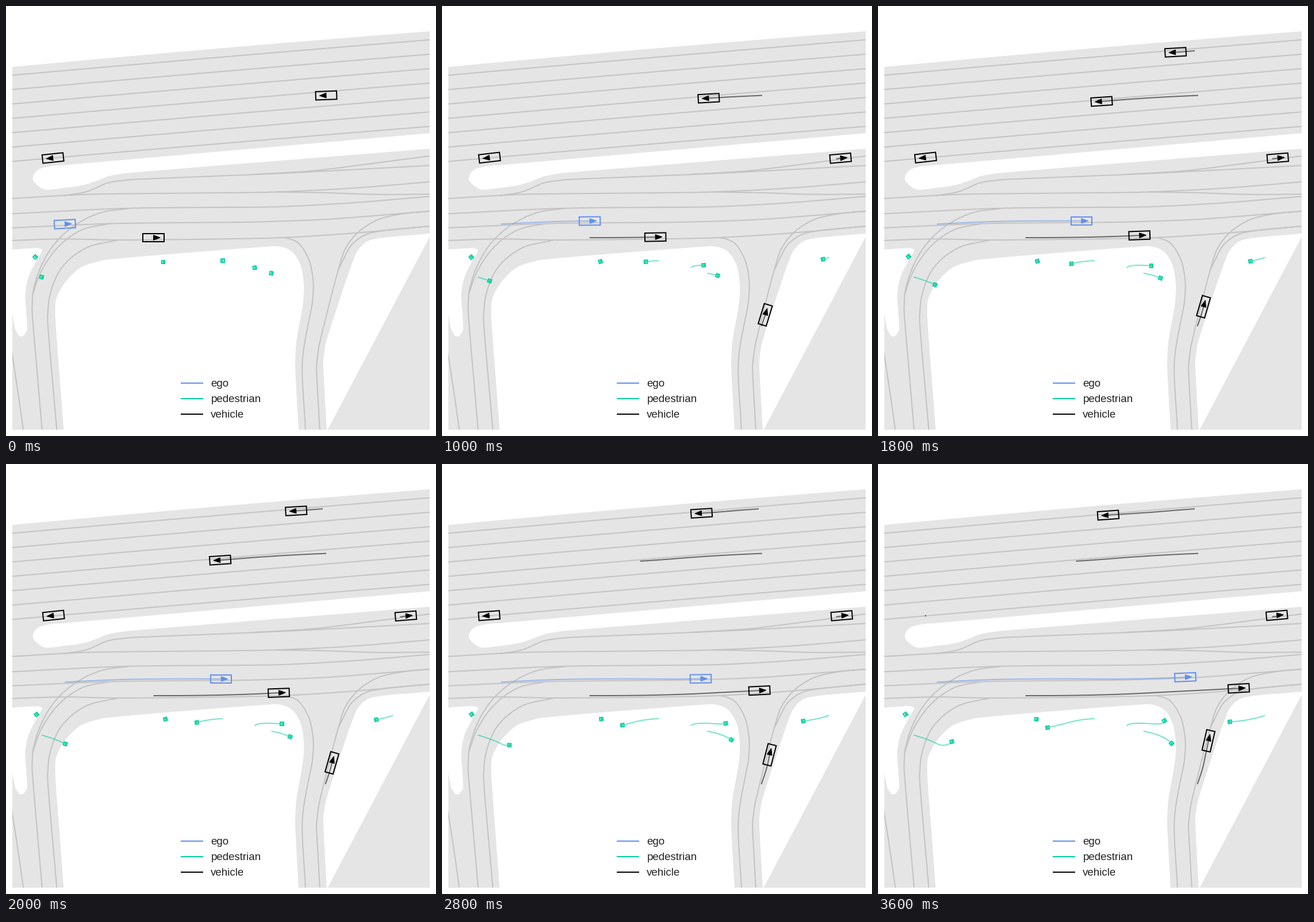
Recreate the animation shown at these times as a matplotlib script. Size 748 by 748 pixels, loop 3800 ms.

```python
import numpy as np
import matplotlib.pyplot as plt
from matplotlib.animation import FuncAnimation
from matplotlib.patches import Polygon

SIZE, DPI = 748, 64
PT = 72 / DPI  # points per pixel
LEFT, RIGHT = 11, 737
FRAMES, STEP = 19, 200

ROAD, LANE = "#e5e5e5", "#c3c3c3"
EGO, PED, CAR = "#6290ec", "#00d0a0", "#000000"

fig = plt.figure(figsize=(SIZE / DPI, SIZE / DPI), dpi=DPI, facecolor="white")
span = (RIGHT - LEFT) / SIZE
ax = fig.add_axes([LEFT / SIZE, LEFT / SIZE, span, span])
ax.set_xlim(LEFT, RIGHT)
ax.set_ylim(RIGHT, LEFT)
ax.axis("off")


def curve(*pts):
    """Smooth path whose handles follow the shorter neighbouring side."""
    pts = np.array(pts, float)
    side = np.hypot(*np.diff(pts, axis=0).T)
    tangent = np.gradient(pts, np.r_[0, np.cumsum(side)], axis=0)
    tangent /= np.hypot(*tangent.T)[:, None]
    reach = np.minimum(np.r_[side, side[-1]], np.r_[side[0], side])
    handle = tangent * reach[:, None] * 0.35
    s = np.linspace(0, 1, 20)[:, None]
    parts = [(1 - s) ** 3 * p + 3 * s * (1 - s) ** 2 * (p + a)
             + 3 * s * s * (1 - s) * (q - b) + s ** 3 * q
             for p, q, a, b in zip(pts, pts[1:], handle, handle[1:])]
    return np.concatenate(parts)


def bowed(y0, y1, lift):
    x = np.linspace(LEFT - 1, RIGHT + 1, 60)
    s = (x - LEFT) / (RIGHT - LEFT)
    return np.c_[x, y0 + (y1 - y0) * s - 4 * lift * s * (1 - s)]


def area(pts, color="white"):
    ax.add_patch(Polygon(pts, fc=color, ec="none", lw=0, zorder=1))


def line(pts, color=LANE, **kw):
    pts = np.asarray(pts, float)
    return ax.plot(pts[:, 0], pts[:, 1], color=color, lw=2 * PT,
                   solid_capstyle="butt", solid_joinstyle="round", **kw)[0]


def lane(*pts):
    line(curve(*pts))


def draw_gaps():
    # median
    area(curve((740, 221), (100, 276.8), (75, 279), (54, 286), (46.5, 300), (64, 318),
               (100, 316.5), (140, 310), (180, 295.7), (207, 291), (740, 248)))
    # island on the left
    area(curve((5, 424), (56, 421.2), (62.5, 424), (53, 443), (39, 472),
               (33.5, 500), (36, 566), (26, 575), (17, 565), (5, 500)))
    # block between the side roads
    area(curve((100.5, 740), (85.5, 535), (87, 511), (102, 482), (130, 455),
               (165, 443), (450, 419), (475, 418.2), (497, 427), (512, 450),
               (518, 485), (517, 515), (505, 585), (503, 620), (509, 740)))
    # block on the right
    area(curve((558, 740), (552, 615), (556, 588), (601, 450), (612, 425),
               (629, 409), (652, 403.5), (740, 395.7)))


def draw_lanes():
    for k in range(7):
        line(bowed(120.4 + 25 * k, 58.8 + 25.1 * k, 0.6))
    lane((8, 335), (130, 328), (470, 323.5), (600, 317), (740, 305.7))
    lane((8, 361.5), (200, 352.2), (480, 349), (600, 342.5), (740, 331))
    lane((8, 386), (180, 378.6), (430, 375.7), (550, 371.5), (740, 356.7))
    lane((8, 408), (95, 405.3), (190, 407), (480, 403), (600, 395.5), (740, 382.7))
    # splits and merges
    lane((470, 323.5), (560, 325), (640, 327.7), (740, 327.3))
    lane((100, 330), (140, 323), (178, 307.5), (212, 302.5), (480, 291), (740, 277.3))
    lane((430, 293), (530, 287), (740, 260.5))
    # side road on the left
    lane((63, 740), (45.3, 526), (47, 498), (60, 455), (85, 413), (122, 380),
         (165, 359.5), (215, 352))
    lane((46.5, 501), (60, 464), (90, 420), (132, 389.5), (180, 378.6))
    lane((88.5, 740), (72.3, 540), (76, 505), (95, 458), (137, 422), (195, 407))
    lane((8, 588), (22, 680), (30.5, 740))
    # side road on the right
    lane((470, 403), (487, 403.5), (507, 411), (526, 439), (534.5, 480),
         (533, 515), (516, 613), (521, 740))
    lane((546, 740), (540.3, 625), (544, 594), (578, 459), (590, 423),
         (610, 396), (645, 372.5), (690, 361.5), (740, 356.7))
    lane((578, 459), (602, 414.5), (626, 397.5), (655, 391), (740, 382.7))


def draw_legend():
    rows = (("ego", EGO), ("pedestrian", PED), ("vehicle", CAR))
    for i, (name, color) in enumerate(rows):
        y = 655.5 + 27.2 * i
        line([(304, y), (343, y)], color, zorder=3)
        ax.text(356.4, y + 6.6, name, family="Liberation Sans", size=18.7 * PT,
                color="#222222", va="baseline")


def glide(keys, ticks):
    """Positions at ticks from a smooth curve through (frame, x, y) keys."""
    t, pts = keys[:, 0], keys[:, 1:]
    speed = np.gradient(pts, t, axis=0, edge_order=2)
    i = np.clip(np.searchsorted(t, ticks, side="right") - 1, 0, len(t) - 2)
    h = (t[i + 1] - t[i])[:, None]
    s = (ticks - t[i])[:, None] / h
    return ((1 + 2 * s) * (1 - s) ** 2 * pts[i] + s * (1 - s) ** 2 * h * speed[i]
            + s * s * (3 - 2 * s) * pts[i + 1] + s * s * (s - 1) * h * speed[i + 1])


class Agent:
    """A heading box that leaves a trail; headings are spread evenly over its life."""

    def __init__(self, color, headings, *keys, end=FRAMES):
        keys = np.array(keys, float)
        self.start, self.end = int(keys[0, 0]), end
        ticks = np.arange(self.start, end, dtype=float)
        self.path = glide(keys, ticks)
        self.heading = np.radians(np.interp(
            ticks, np.linspace(self.start, end - 1, len(headings)), headings))
        self.trail = line([(0, 0)], color, alpha=0.55, zorder=4)
        style = dict(ec=color, joinstyle="miter", zorder=5)
        self.box = ax.add_patch(Polygon([(0, 0)] * 4, fc="none", lw=2 * PT, **style))
        self.tip = ax.add_patch(Polygon([(0, 0)] * 3, fc=color, lw=PT, **style))
        w, h = (5.6, 5.6) if color == PED else (36.5, 14.5)
        self.box_pts = np.array([(-w, -h), (w, -h), (w, h), (-w, h)]) / 2
        self.tip_pts = np.array([(0, -0.3 * h), (0.32 * w, 0), (0, 0.3 * h)])

    def show(self, frame):
        n = max(0, frame - self.start + 1)
        self.trail.set_data(*self.path[:n].T)
        live = self.start <= frame < self.end
        self.box.set_visible(live)
        self.tip.set_visible(live)
        if live:
            a = self.heading[n - 1]
            turn = np.array([(np.cos(a), -np.sin(a)), (np.sin(a), np.cos(a))])
            self.box.set_xy(self.box_pts @ turn + self.path[n - 1])
            self.tip.set_xy(self.tip_pts @ turn + self.path[n - 1])


area(np.r_[bowed(106, 44, 1.5), [(740, 740), (8, 740)]], ROAD)
draw_gaps()
draw_lanes()
draw_legend()

agents = [
    Agent(CAR, (182, 183.5, 184), (0, 557, 155.6), (7, 426.5, 163),
          (9, 389, 166), (12, 344.5, 169), end=13),
    Agent(CAR, (186, 187, 184), (0, 81.7, 264.4), (8, 82.8, 263.7),
          (15, 81.8, 263.8), end=16),
    Agent(CAR, (0, 2, 3.3), (0, 256.5, 403), (7, 414, 400.8),
          (12, 513.5, 396), (18, 627.5, 390.2)),
    Agent(CAR, (5.5, 4.5, 5), (1, 685.5, 265.9), (6, 694.3, 264.6),
          (9, 695.3, 264.4), (18, 693.8, 263.3)),
    Agent(CAR, (72.5, 74, 77), (2, 555.6, 557), (5, 562.3, 537.2),
          (9, 566.2, 523.1), (14, 569.8, 505.9), (18, 574.9, 481.5)),
    Agent(CAR, (183, 184), (6, 551, 78), (7, 535, 79.2), (9, 517.6, 80.5),
          (12, 475.4, 84), (14, 451.5, 85.6), (18, 400.4, 89)),
]
agents += [
    Agent(PED, (45, 40, 30), (0, 51, 436.6), (3, 50, 437.1),
          (8, 53, 436), (18, 47.6, 435.5)),
    Agent(PED, (-15, -20, 15), (0, 62, 471.4), (7, 91, 481.2),
          (12, 110.6, 489.2), (18, 128.5, 483)),
    Agent(PED, (0, 22, 12, -6), (0, 273.5, 445.6), (3, 274.6, 445),
          (8, 277, 444), (18, 275.6, 444)),
    Agent(PED, (180, 190), (0, 377.2, 443.1), (7, 345.5, 446.4),
          (12, 323, 452), (18, 295, 458.6)),
    Agent(PED, (10, 0, 0, 32), (0, 432.6, 455.3), (1, 436.6, 452.7),
          (3, 445.6, 451.4), (14, 493.6, 451.2), (18, 498.2, 446.6)),
    Agent(PED, (-12, -20, -45), (0, 461.6, 464.8), (7, 485.8, 471),
          (18, 510.6, 486)),
    Agent(PED, (194, 187), (2, 673.6, 437.2), (7, 655.5, 442.4),
          (18, 612, 448.5)),
]
agents.append(
    Agent(EGO, (3, 0, 0, 2.5), (0, 102.4, 379.4), (3, 199.5, 375), (7, 308.7, 373.8),
          (12, 413, 374), (14, 450, 373.6), (18, 534.5, 370.9)))


def update(frame):
    for agent in agents:
        agent.show(frame)
    return []


anim = FuncAnimation(fig, update, frames=FRAMES, interval=STEP,
                     init_func=lambda: update(0), repeat=True, repeat_delay=0)
plt.show()
```
